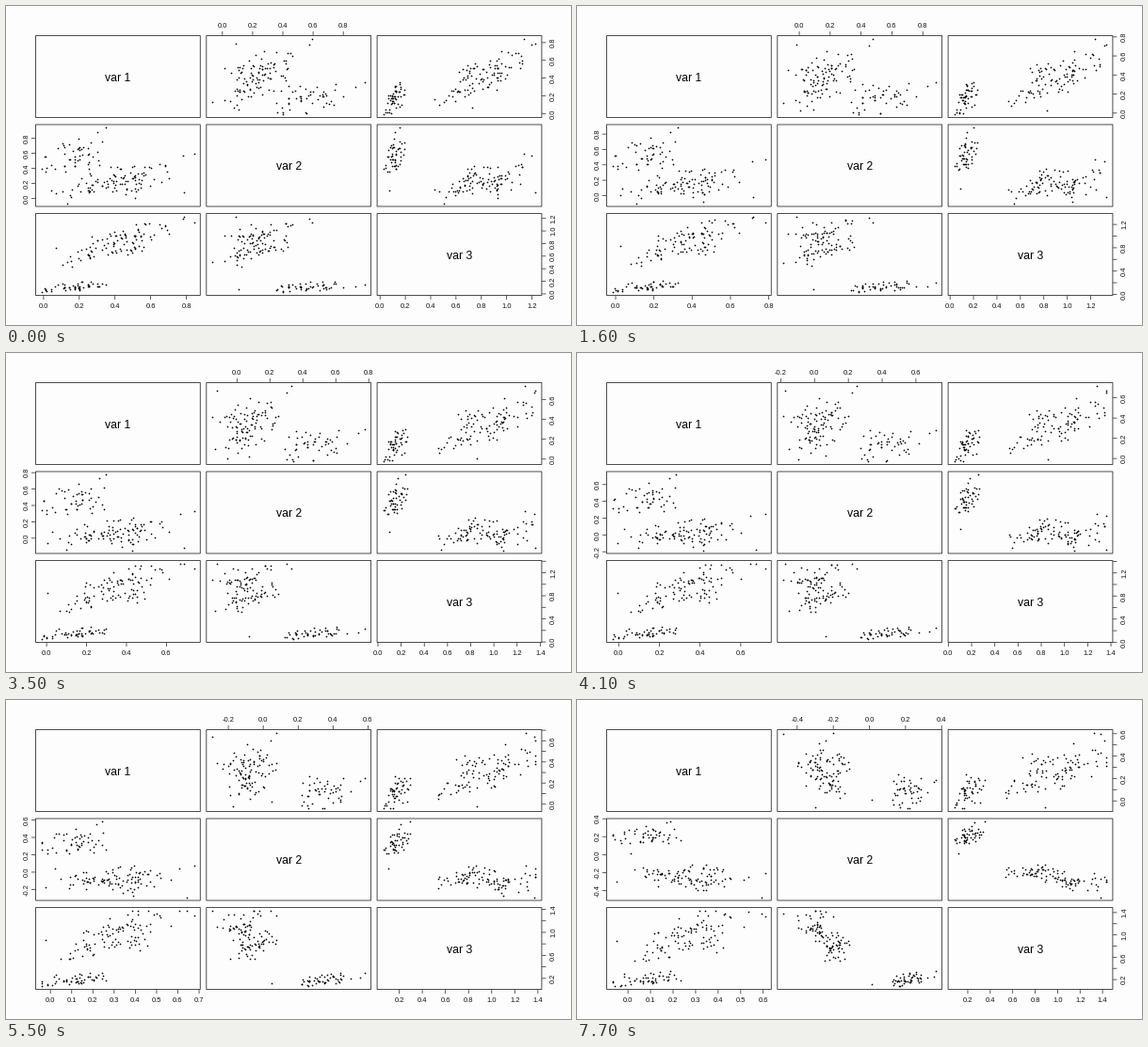
A matplotlib script that plays this animation: 600x339 px, repeating every 8000 ms.

```python
import math

import matplotlib.pyplot as plt
import numpy as np
from matplotlib.animation import FuncAnimation
from matplotlib.collections import LineCollection

W, H, DPI = 600, 339, 100
PX = 72 / DPI
FONT = "Liberation Sans"
INK = "#3a3a3a"

# Panel grid in pixels
LEFT, TOP = 31.5, 31.5
PANEL_W, PANEL_H = 174.8, 87
STEP_X, STEP_Y = 181.3, 94.5
RIGHT = LEFT + 2 * STEP_X + PANEL_W
BOTTOM = TOP + 2 * STEP_Y + PANEL_H

# Frames (100 ms each) at which the projection moves on
STEPS = [0, 2, *range(7, 10), *range(14, 17), 23, *range(25, 31), 35, 38, 41,
         45, 47, 48, 50, 51, 52, 55, 57, 58, *range(62, 70), *range(72, 78)]
TURN, END = 25, 77

# Projections of four measurements onto three variables along the tour
START_VIEW = np.array([[.99, -.02, -.10, -.05], [.02, .96, .03, -.22], [.07, .02, .975, .20]])
TURN_VIEW = np.array([[.98, -.035, -.08, -.14], [.00, .91, .00, -.29], [.06, .055, .845, .48]])
END_VIEW = np.array([[.93, -.14, -.02, -.25], [.03, .42, -.38, -.25], [.10, .17, .50, .81]])

# Per group: mean, spread, shared correlation, outlying points
GROUPS = [
    ([5.0, 3.42, 1.46, .25], [.34, .31, .17, .10], .3,
     [[5.7, 4.4, 1.5, .4], [5.5, 4.2, 1.4, .2], [4.5, 2.3, 1.3, .3], [4.3, 3.0, 1.1, .1]]),
    ([5.97, 2.79, 4.32, 1.34], [.50, .30, .42, .19], .62,
     [[5.0, 2.0, 3.5, 1.0], [4.9, 2.4, 3.3, 1.0], [5.1, 2.5, 3.0, 1.1]]),
    ([6.5, 2.95, 5.45, 2.02], [.46, .28, .41, .26], .45,
     [[7.9, 3.8, 6.4, 2.0], [7.7, 3.8, 6.7, 2.2], [7.7, 2.6, 6.9, 2.3],
      [4.9, 2.5, 4.5, 1.7], [7.2, 3.6, 6.1, 2.5]]),
]
LOW = np.array([4.3, 2.0, 1.0, .1])
HIGH = np.array([7.9, 4.4, 6.9, 2.5])


def make_data():
    rng = np.random.default_rng(7)
    parts = []
    for mean, spread, corr, outliers in GROUPS:
        n = 50 - len(outliers)
        common, own = rng.normal(size=(n, 1)), rng.normal(size=(n, 4))
        z = math.sqrt(corr) * common + math.sqrt(1 - corr) * own
        z = np.clip((z - z.mean(0)) / z.std(0), -1.8, 1.8)
        parts += [np.round(mean + z * spread, 1), outliers]
    return (np.vstack(parts) - LOW) / (HIGH - LOW)


def view(t):
    if t < TURN:
        p = math.sin(math.pi / 2 * t / TURN)
        return START_VIEW + p * (TURN_VIEW - START_VIEW)
    p = (t - TURN) / (END - TURN)
    return TURN_VIEW + p * (END_VIEW - TURN_VIEW)


def to_x(col, u):
    return LEFT + col * STEP_X + u * PANEL_W


def to_y(row, u):
    return TOP + row * STEP_Y + (1 - u) * PANEL_H


def ticks(lo, hi):
    """Round values that split the range into about five steps."""
    cell = (hi - lo) / 5
    step = base = 10 ** math.floor(math.log10(cell))
    if 2 * base - cell < .8 * (cell - base):
        step = 2 * base
    return [k * step for k in range(math.ceil(lo / step), math.floor(hi / step) + 1)]


DATA = make_data()

fig = plt.figure(figsize=(W / DPI, H / DPI), dpi=DPI, facecolor="#fdfdfd")
ax = fig.add_axes([0, 0, 1, 1])
ax.set_xlim(0, W)
ax.set_ylim(H, 0)
ax.axis("off")

for row in range(3):
    for col in range(3):
        ax.add_patch(plt.Rectangle((to_x(col, 0), to_y(row, 1)), PANEL_W, PANEL_H,
                                   fill=False, ec=INK, lw=.9 * PX, snap=False))
    ax.text(to_x(row, .5), to_y(row, .5) + 5, f"var {row + 1}", family=FONT,
            size=12.3 * PX, ha="center", va="baseline", color="black")

dots = ax.scatter([], [], s=(1.7 * PX) ** 2, c="black", linewidths=0, snap=False)
marks = ax.add_collection(LineCollection([], colors=INK, linewidths=.8 * PX, snap=False))
pool = [ax.text(0, 0, "", family=FONT, size=7.5 * PX, ha="center", va="baseline",
                rotation_mode="anchor", color="#111111") for _ in range(60)]


def axis_parts(var, lo, hi, vertical):
    """Tick segments and labels (x, y, rotation, text) of one axis."""
    near_side = var == 1
    if vertical:
        edge, out, base = (LEFT, LEFT - 4.5, 24) if near_side else (RIGHT, RIGHT + 4.5, 583)
    else:
        edge, out, base = (TOP, TOP - 4.5, 23.3) if near_side else (BOTTOM, BOTTOM + 4.5, 321)
    segments, labels, last = [], [], -math.inf
    for v in ticks(lo, hi):
        u = (v - lo) / (hi - lo)
        p = to_y(var, u) if vertical else to_x(var, u)
        segments.append([(edge, p), (out, p)] if vertical else [(p, edge), (p, out)])
        # labels too close to the previous one are skipped
        if abs(p - last) >= 13:
            last = p
            place = (base, p, 90) if vertical else (p, base, 0)
            labels.append((*place, f"{v:.1f}"))
    return segments, labels


def draw(frame):
    t = max(s for s in STEPS if s <= frame)
    proj = DATA @ view(t).T
    pad = .04 * np.ptp(proj, axis=0)
    lo, hi = proj.min(0) - pad, proj.max(0) + pad
    unit = (proj - lo) / (hi - lo)

    dots.set_offsets(np.vstack([
        np.column_stack([to_x(col, unit[:, col]), to_y(row, unit[:, row])])
        for row in range(3) for col in range(3) if row != col]))

    segments, labels = [], []
    for var in range(3):
        for vertical in (False, True):
            lines, texts = axis_parts(var, lo[var], hi[var], vertical)
            segments += lines
            labels += texts
    marks.set_segments(segments)
    for item in pool:
        item.set_text("")
    for item, (x, y, turn, text) in zip(pool, labels):
        item.set_position((x, y))
        item.set_rotation(turn)
        item.set_text(text)
    return [dots, marks, *pool]


anim = FuncAnimation(fig, draw, frames=80, interval=100, repeat=True,
                     repeat_delay=0, blit=False)
plt.show()
```
